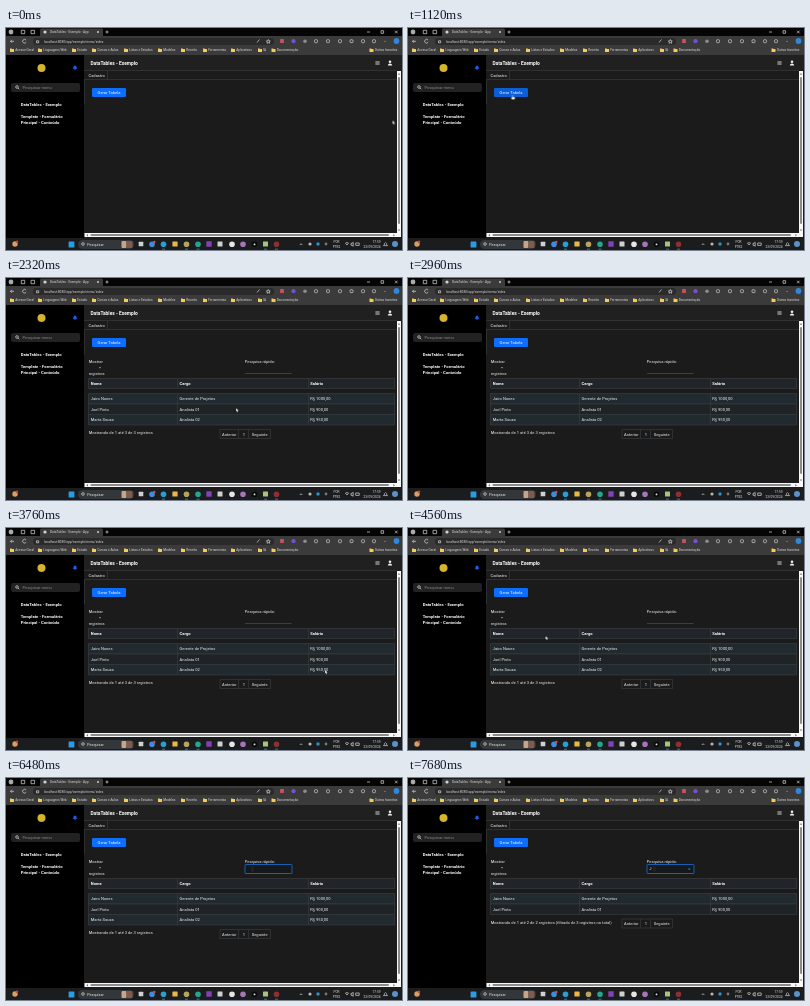
These frames come from a looping animation (396 by 222 pixels, 8000 ms). An HTML page:

```html
<!DOCTYPE html>
<html lang="pt-BR">
<head>
<meta charset="utf-8">
<title>DataTables - Exemplo</title>
<style>
html, body { margin: 0; width: 100%; height: 100%; overflow: hidden; background: #000; }
svg { display: block; width: 100vw; height: 100vh; }
text { font: 4.07px Roboto, sans-serif; fill: #f0f0f0; white-space: pre; }
.b { font-weight: 700; fill: #fff; }
.menu { font-size: 4.2px; }
.title { font-size: 4.87px; }
.tiny { font-size: 3.2px; fill: #dcdcdc; }
.mid { text-anchor: middle; }
.line { stroke: #373b3e; stroke-width: .7; fill: none; }
.ico { stroke: #d8d8d8; stroke-width: .7; fill: none; }

.t { animation: 8s step-end infinite; }
.table { animation-name: table; }
.full { animation-name: full; }
.found { animation-name: found; }
.focus { animation-name: focus; }
.press { animation-name: press; }
.hover { animation-name: hover; }
.arrow { animation-name: arrow; }
.hand { animation-name: hand; }
.beam { animation-name: beam; }
.pager { animation-name: pager; }
.mouse { animation: move 8s ease-in-out infinite; }

@keyframes table { 0% { visibility: hidden } 19%, 100% { visibility: visible } }
@keyframes full { 0% { opacity: 1 } 90%, 100% { opacity: 0 } }
@keyframes found { 0% { opacity: 0 } 90%, 100% { opacity: 1 } }
@keyframes focus { 0% { opacity: 0 } 72%, 100% { opacity: 1 } }
@keyframes pager { 0% { transform: none } 90%, 100% { transform: translateY(-10.5px) } }
@keyframes press { 0%, 23%, 75%, 100% { opacity: 0 } 20%, 73% { opacity: 1 } }
@keyframes hover { 0%, 26.5%, 100% { fill: #0d6efd } 10.3% { fill: #0b5ed7 } }
@keyframes arrow { 0%, 26.5%, 47% { opacity: 1 } 10.3%, 34%, 66%, 100% { opacity: 0 } }
@keyframes hand { 0%, 26.5%, 100% { opacity: 0 } 10.3% { opacity: 1 } }
@keyframes beam { 0%, 47% { opacity: 0 } 34%, 66%, 100% { opacity: 1 } }
@keyframes move {
  0%, 1% { transform: translate(386.5px, 92.5px) }
  11%, 12% { transform: translate(106px, 66.3px) }
  14%, 26% { transform: translate(104.5px, 67px) }
  29% { transform: translate(230px, 130px) }
  31.5% { transform: translate(345px, 199px) }
  34%, 47% { transform: translate(319px, 142px) }
  50% { transform: translate(372px, 130px) }
  53%, 55% { transform: translate(131px, 109px) }
  57% { transform: translate(137.5px, 108px) }
  65%, 66% { transform: translate(247px, 97px) }
  70%, 100% { transform: translate(246.5px, 91px) }
}
</style>
</head>
<body>
<svg viewBox="0 0 396 222" preserveAspectRatio="none">
  <!-- browser -->
  <rect width="396" height="9" fill="#050505"/>
  <path d="M34 9V2q0-1.5 1.5-1.5h60q1.5 0 1.5 1.5v7z" fill="#3b3b3b"/>
  <rect y="8" width="396" height="19" fill="#3b3b3b"/>
  <rect x="27" y="10" width="241" height="7" rx="3.4" fill="#2a2a2a"/>
  <circle cx="5" cy="4" r="2.4" fill="#aaa"/>
  <circle cx="39" cy="4" r="1.6" fill="#c9d6e2"/>
  <text class="tiny" x="44" y="5.2">DataTables - Exemplo - App</text>
  <g class="ico">
    <path d="M15.3 2.3h3.4v3.4h-3.4zM25 2.3h3.6v3.4h-3.6zM91 3l2 2m0-2l-2 2M101 2.5v3m-1.5-1.5h3"/>
    <path d="M361 4h3M375 2.7h2.6v2.6h-2.6zM389 2.7l2.6 2.6m0-2.6l-2.6 2.6"/>
    <path d="M8 13.3H4.5l1.5-1.5m-1.5 1.5l1.5 1.5M20 12a1.9 1.9 0 1 0 .2 2.2"/>
    <path d="M30.5 12.8h2.2v2h-2.2zM251 14.5l2.5-3M262.3 11.5l.6 1.3 1.4.1-1 1 .3 1.4-1.3-.7-1.3.7.3-1.4-1-1 1.4-.1z"/>
  </g>
  <text class="tiny" x="38" y="14.6">localhost:8080/app/exemplo/menu/index</text>
  <g id="tools"></g>
  <g id="marks"></g>

  <!-- page -->
  <rect y="27" width="78" height="183" fill="#000"/>
  <rect x="78" y="27" width="318" height="183" fill="#1b1b1b"/>
  <rect x="78" y="27" width="318" height="15.5" fill="#202020"/>
  <path class="line" d="M78 42.5H391M78 51.5H391M101.5 43V51.5M78.5 52V76"/>
  <circle cx="35.5" cy="40" r="4" fill="#d5b52d"/>
  <path d="M66.7 41q.8-.6.8-2 0-1.5 1.5-1.6 1.5.1 1.5 1.6 0 1.4.8 2zM68.3 41.3h1.4v.7h-1.4z" fill="#1f5be0"/>
  <rect x="5" y="55" width="69" height="9" rx="2" fill="#222"/>
  <g class="ico"><circle cx="11" cy="59" r="1.3"/><path d="M12 60l1.3 1.3"/></g>
  <text x="16.5" y="60.9" style="fill:#8b8b8b">Pesquisar menu</text>
  <text class="b menu" x="14.7" y="78">DataTables - Exemplo</text>
  <text class="b menu" x="14.7" y="90">Template - Formulário</text>
  <text class="b menu" x="14.7" y="96.3">Principal - Conteúdo</text>
  <text class="b title" x="84.4" y="36.9">DataTables - Exemplo</text>
  <rect x="369.4" y="33" width="4.2" height="4" fill="#777"/>
  <g fill="#eee"><circle cx="384" cy="33.8" r="1.3"/><path d="M381.8 37.6q.2-2.2 2.2-2.2t2.2 2.2z"/></g>
  <text x="82.5" y="49">Cadastro</text>

  <rect class="t hover" x="86" y="60" width="34" height="9" rx="1.3" fill="#0d6efd"/>
  <text class="mid" x="103" y="66" style="fill:#fff">Gerar Tabela</text>

  <g class="t table">
    <text x="82.7" y="85.4">Mostrar</text>
    <path d="M93 89.3h2l-1 1.2z" fill="#ccc"/>
    <text x="82.7" y="97.3">registros</text>
    <text x="238.8" y="85.4">Pesquisa rápida:</text>
    <path d="M239 95.5h46.5" stroke="#4a4f54" stroke-width=".7"/>
    <g class="t focus">
      <rect x="239" y="86.5" width="47" height="9" rx=".8" fill="#15191c" stroke="#1768c4" stroke-width=".9"/>
    </g>
    <g class="t found">
      <text x="241.3" y="92.3" style="fill:#fff">J</text>
      <path d="M280.3 90.2l1.8 1.8m0-1.8l-1.8 1.8" stroke="#2c86e8" stroke-width=".6"/>
    </g>

    <rect x="82" y="100" width="307" height="11" fill="#212529"/>
    <path class="line" d="M82.5 100.5H388.5V110.5H82.5z"/>
    <g id="head"></g>
    <g id="rows"></g>
    <text class="t full" x="82.7" y="156.3">Mostrando de 1 até 3 de 3 registros</text>
    <text class="t found" x="82.7" y="145.7">Mostrando de 1 até 2 de 2 registros (filtrado de 3 registros no total)</text>
    <g class="t pager">
      <path class="line" d="M214 151.5h50.5v9H214zM232.5 151.5v9M242.5 151.5v9"/>
      <text class="mid" x="223.3" y="157.5">Anterior</text>
      <text class="mid" x="238" y="157.5">1</text>
      <text class="mid" x="253.7" y="157.5">Seguinte</text>
    </g>
  </g>

  <!-- scrollbars -->
  <path d="M391 43h4v166H78.5v-4H391z" fill="#f8f8f8"/>
  <rect x="392" y="49" width="2" height="147" rx="1" fill="#8b8b8b"/>
  <rect x="84.5" y="206" width="298.5" height="2" rx="1" fill="#8b8b8b"/>
  <path d="M82 206v2.6l-1.7-1.3zM387.3 206v2.6l1.7-1.3zM391.8 46.8h2.4l-1.2-1.7zM391.8 201.5h2.4l-1.2 1.7z" fill="#777"/>

  <!-- taskbar -->
  <rect y="210" width="396" height="12" fill="#1b1c1d"/>
  <circle cx="9" cy="216" r="2.7" fill="#d9a066"/>
  <circle cx="11" cy="213.8" r="1.3" fill="#c8432f"/>
  <rect x="72" y="212" width="56" height="9" rx="4.5" fill="#34373a"/>
  <circle class="ico" cx="77" cy="216" r="1.3"/>
  <text x="81.3" y="217.9" style="font-size:3.7px">Pesquisar</text>
  <rect x="115.5" y="213" width="5" height="7" rx="1" fill="#c8a588"/>
  <rect x="120.5" y="213" width="6" height="7" rx="1" fill="#805a4d"/>
  <g id="bar"></g>
  <g class="ico">
    <path d="M293.8 217l1.3-1.3 1.3 1.3M339 215.5q2-2 4 0M340 216.7q1-1 2 0M345 215.3h1l1.2-1v4l-1.2-1h-1zM349.7 215h3.5v2.4h-3.5zM377.5 217.6q1-.7 1-2 1-2 2 0 0 1.3 1 2z"/>
  </g>
  <text class="tiny mid" x="330.5" y="215.4">POR</text>
  <text class="tiny mid" x="330.5" y="219.6">PTB2</text>
  <text class="tiny" x="374.5" y="215.4" text-anchor="end">17:59</text>
  <text class="tiny" x="374.5" y="219.6" text-anchor="end">23/09/2024</text>

  <!-- pointer -->
  <g class="mouse">
    <path class="t arrow" d="M0 0v3.6l.9-.7.6 1.4.7-.3-.6-1.4 1.1-.1z" fill="#fff" stroke="#000" stroke-width=".2"/>
    <path class="t hand" d="M-.4 0h.9v1.7l2 .5-.3 2.2h-2.7L-1.6 2.7l.5-.5.7.5z" fill="#fff" stroke="#111" stroke-width=".25"/>
    <path class="t beam" d="M-.7-1.8h1.4M0-1.8v3.6M-.7 1.8h1.4" stroke="#5a5a5a" stroke-width=".4"/>
    <circle class="t press" r="1.7" fill="#e0483c" fill-opacity=".85"/>
  </g>
</svg>
<script>
const put = (id, html) => document.getElementById(id).innerHTML = html;
const dot = (x, y, r, c) => `<circle cx="${x}" cy="${y}" r="${r}" fill="${c}"/>`;
const box = (x, y, s, c) => `<rect x="${x - s / 2}" y="${y - s / 2}" width="${s}" height="${s}" rx=".5" fill="${c}"/>`;
const text = (x, y, s, cls = '') => `<text x="${x}" y="${y}" class="${cls}">${s}</text>`;

const marks = [
  [4, 'Acesso Geral'], [32, 'Linguagens Web'], [66, 'Estudo'], [86, 'Cursos e Aulas'],
  [118, 'Listas e Estudos'], [152, 'Modelos'], [175, 'Receita'], [197, 'Ferramentas'],
  [225, 'Aplicativos'], [252, 'IA'], [265.5, 'Documentação'], [363.5, 'Outros favoritos']
];
put('marks', marks.map(([x, s]) =>
  `<path d="M${x} 20.4h1.5l.5.6h2v3h-4z" fill="#f7cb4d"/>` + text(x + 5.2, 23.4, s, 'tiny')).join(''));

const plain = [310, 322, 334, 345.5, 357, 368];
put('tools', box(276, 13, 3.8, '#c65160') + dot(287.5, 13.2, 2.1, '#7552c9') + dot(299, 13.2, 1.8, '#8a8f8d')
  + plain.map(x => `<rect class="ico" x="${x - 1.5}" y="11.7" width="3" height="3" rx="1"/>`).join('')
  + dot(379, 13.2, .5, '#ccc') + dot(390.5, 13, 2.9, '#3187d8'));

const cols = [84.8, 173.6, 304.3];
put('head', ['Nome', 'Cargo', 'Salário'].map((s, i) => text(cols[i], 107.2, s, 'b')).join('')
  + '<path class="line" d="M171.5 100.5V110.5M302.5 100.5V110.5"/>');

const people = [
  ['Jairo Nunes', 'Gerente de Projetos', 'R$ 1000,00'],
  ['Joel Pinto', 'Analista 01', 'R$ 900,00'],
  ['Marta Souza', 'Analista 02', 'R$ 950,00']
];
put('rows', people.map((row, i) => {
  const y = 115.5 + i * 10.5;
  return `<g class="${i == 2 ? 't full' : ''}">
    <rect x="82" y="${y}" width="307" height="10.5" fill="${i % 2 ? '#1f2326' : '#212a2f'}"/>
    <path class="line" d="M82.5 ${y}h306v10.5h-306zM171.5 ${y}v10.5M302.5 ${y}v10.5"/>`
    + row.map((s, c) => text(cols[c], y + 6.7, s)).join('') + '</g>';
}).join(''));

const apps = [
  [146, '#3c8de0'], [157.5, '#2b9fd0'], [180.5, '#b8a45c'], [192, '#25a58a'],
  [226, '#e6e6e6'], [237, '#a774b8'], [248.5, '#08090a'], [270.5, '#8f2f30']
];
put('bar', box(65.5, 216.5, 5.8, '#2a9be4') + box(135, 216, 4.6, '#d0d0d0') + box(169, 216, 5.2, '#e9b943')
  + box(203, 216, 5.4, '#8440b5') + box(214, 216, 5, '#cfcfcf') + box(259.5, 216, 5, '#a8c47c')
  + apps.map(([x, c]) => dot(x, 216.3, 2.8, c)).join('')
  + dot(148.3, 214, 1.2, '#d94c45') + box(248.5, 216.3, 1.8, '#ddd')
  + dot(304, 216, 1.6, '#b8b8b8') + dot(312, 216, 1.7, '#2f91c9') + dot(320, 216, 1.4, '#777')
  + dot(389, 216, 3, '#5a91c8')
  + [157.5, 180.5, 192, 259.5, 270.5].map(x => `<path d="M${x - 1.5} 221.2h3" stroke="#6aa9d8" stroke-width=".6"/>`).join(''));
</script>
</body>
</html>
```
